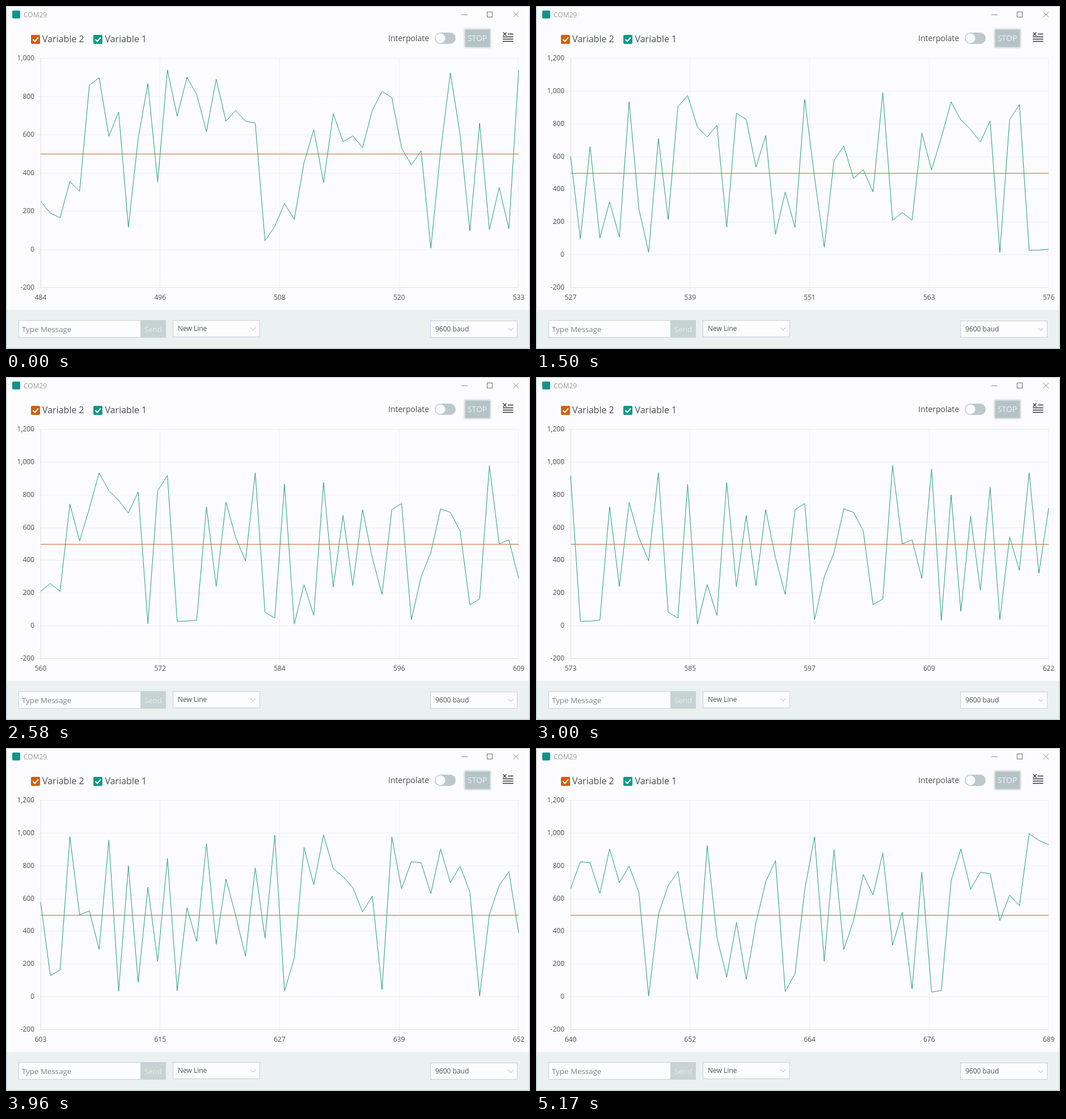
These frames come from a looping animation (924x606 px, 5.26 s). An HTML page:

```html
<!DOCTYPE html>
<html lang="en">
<head>
<meta charset="utf-8">
<title>Serial plotter</title>
<style>
  html, body { margin: 0; width: 100%; height: 100%; overflow: hidden; background: #fcfcfe; }
  svg { display: block; font-family: "Open Sans", sans-serif; fill: #4a5052; }
  .axis { font-size: 12px; }
  .grid { stroke: #dfe2ef; stroke-dasharray: 1 1; }
  .line { fill: none; stroke-linejoin: round; }
  .field { fill: #fdfdff; stroke: #c6cddc; }
</style>
</head>
<body>
<svg width="924" height="606" viewBox="0 0 924 606">
  <defs>
    <filter id="soft" x="-20%" y="-20%" width="140%" height="140%">
      <feGaussianBlur stdDeviation="1.5"/>
    </filter>
  </defs>
  <rect width="924" height="606" fill="#fcfcfe"/>
  <rect y="537" width="924" height="69" fill="#ebf1f0"/>
  <rect x="1" y=".5" width="922" height="604.500" fill="none" stroke="#c0d0d4" stroke-width="1.500"/>

  <!-- title bar -->
  <rect x="11" y="8" width="14" height="14" rx="2" fill="#10938f"/>
  <text x="31" y="19.5" font-size="12" fill="#9a9a92">COM29</text>
  <g fill="none" stroke="#8f8f86">
    <path d="M803 15.5h11M894.5 10.5l9.500 9.500m0-9.500l-9.500 9.500"/>
    <rect x="848.5" y="10.5" width="9" height="9" stroke="#6c6c6c"/>
  </g>

  <!-- toolbar -->
  <g font-size="16">
    <rect x="44" y="51" width="16" height="16" rx="2" fill="#d35f0c"/>
    <rect x="154" y="51" width="16" height="16" rx="2" fill="#0c9a86"/>
    <path d="M47.500 59l3.500 3.500 6-7M157.500 59l3.500 3.500 6-7" fill="none" stroke="#fff" stroke-width="2"/>
    <text x="64" y="64">Variable 2</text>
    <text x="174.500" y="64">Variable 1</text>
  </g>
  <text x="674" y="62" font-size="14">Interpolate</text>
  <rect x="756" y="47" width="37" height="20" rx="10" fill="#bcc8cc"/>
  <circle cx="766" cy="57" r="8.500" fill="#fdfdff"/>
  <rect x="808" y="40" width="47" height="34" rx="2" fill="#c8d2d6" filter="url(#soft)"/>
  <rect x="810" y="42" width="43" height="30" fill="#b4c3c6"/>
  <text x="831" y="62" font-size="14" text-anchor="middle" fill="#eef4f6">STOP</text>
  <path d="M876.500 46.500l6 6m0-6l-6 6M885 49.500h9.500M876 54.500h18.500M876 58.500h18.500M876 62.500h18.500"
        fill="none" stroke="#2f3433" stroke-width="1.300"/>

  <!-- chart -->
  <g id="grid"></g>
  <path d="M61.500 92v406.500M61 497.500h843" stroke="#dde0d8"/>
  <polyline id="fixed" class="line" stroke="#c9652c"/>
  <polyline id="random" class="line" stroke="#229c7c"/>

  <!-- message bar -->
  <rect class="field" x="22.500" y="555.500" width="215" height="30"/>
  <rect x="237" y="555" width="45" height="31" fill="#c6d2d3"/>
  <rect class="field" x="294.500" y="555.500" width="153" height="29"/>
  <rect class="field" x="748.500" y="556.500" width="153" height="29"/>
  <text x="28" y="575.500" font-size="13.330" fill="#7d8480">Type Message</text>
  <text x="244" y="575.500" font-size="13.330" fill="#e7eeea">Send</text>
  <text x="303" y="574" font-size="12">New Line</text>
  <text x="757" y="575" font-size="12">9600 baud</text>
  <path d="M431 568l4.500 4.500 4.500-4.500M885.500 569l4.500 4.500 4.500-4.500" fill="none" stroke="#a4abb2"/>
</svg>
<script>
const LOOP = 5260, LAST = 49, STEP = 200;
const left = 61, top0 = 92.5, width = 843, height = 405;
const $ = id => document.getElementById(id);

// Minimal standard generator, seed 1, as behind Arduino's random(0, 1000)
const data = [];
for (let i = 0, x = 1; i < 700; i++) {
  x = x * 16807 % 2147483647;
  data.push(x % 1000);
}

// Runs of redraws: first time, last time, count
const runs = [
  [130, 630, 11], [670, 1170, 11], [1210, 1500, 7], [1580, 1710, 4],
  [1790, 2130, 8], [2210, 2290, 3], [2330, 2830, 11], [2880, 3000, 4],
  [3080, 3330, 7], [3420, 3580, 5], [3630, 3920, 7], [3960, 4380, 9],
  [4420, 4460, 2], [4500, 5000, 12], [5040, 5170, 3]
];
const redraws = [0, ...runs.flatMap(([a, b, n]) =>
  Array.from({ length: n }, (_, k) => a + (b - a) * k / (n - 1)))];

// Newest sample received by a given time
const arrivals = [[0, 533], [100, 533], [1500, 576], [2130, 595], [3000, 622],
  [3580, 641], [4380, 665], [5170, 689]];
function newest(t) {
  const k = Math.max(1, arrivals.findIndex(([time]) => time >= t));
  const [t0, n0] = arrivals[k - 1], [t1, n1] = arrivals[k];
  return Math.round(n0 + (n1 - n0) * (t - t0) / (t1 - t0));
}

const crisp = v => Math.floor(v) + 0.5;
const rule = (x1, y1, x2, y2) => `<path class="grid" d="M${x1} ${y1}L${x2} ${y2}"/>`;
const label = (x, y, anchor, text) =>
  `<text class="axis" x="${x}" y="${y}" text-anchor="${anchor}">${text}</text>`;

function draw(end) {
  const start = end - LAST, shown = data.slice(start, end + 1);
  const min = Math.min(...shown), max = Math.max(...shown);
  const grace = (max - min) * 0.025;
  const low = Math.floor((min - grace) / STEP) * STEP;
  const high = Math.ceil((max + grace) / STEP) * STEP;
  const yOf = v => top0 + (high - v) / (high - low) * height;

  let grid = "";
  for (let v = low; v <= high; v += STEP) {
    const y = crisp(yOf(v));
    grid += rule(56, y, left + width, y) + label(50, y + 3.5, "end", v.toLocaleString("en-US"));
  }
  for (let k = 0; k <= 4; k++) {
    const x = left + width * k / 4, line = crisp(Math.min(x, 903));
    grid += rule(line, 93, line, 502) + label(x, 519, "middle", Math.floor(start + LAST * k / 4));
  }
  $("grid").innerHTML = grid;

  const y = crisp(yOf(500));
  $("fixed").setAttribute("points", `${left},${y} ${left + width},${y}`);
  $("random").setAttribute("points", shown.map((v, i) =>
    `${(left + width * i / LAST).toFixed(2)},${yOf(v).toFixed(2)}`).join(" "));
}

let current;
function tick() {
  const t = performance.now() % LOOP;
  const end = newest(redraws.findLast(time => time <= t));
  if (end !== current) draw(current = end);
  requestAnimationFrame(tick);
}
tick();
</script>
</body>
</html>
```
